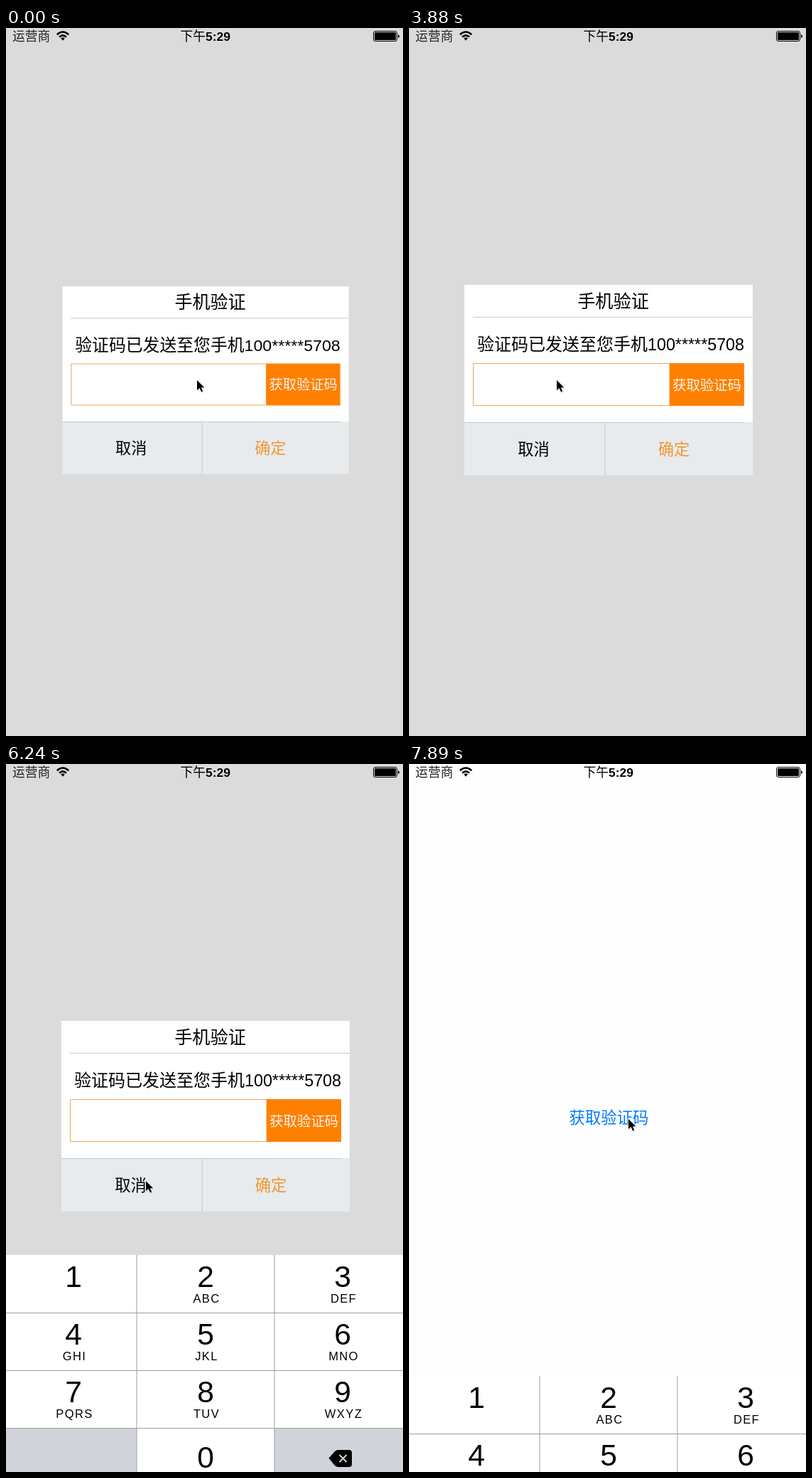
An HTML page for the animation above (8000 ms loop, 559x995 px).

```html
<!DOCTYPE html>
<html lang="zh-CN">
<head>
<meta charset="utf-8">
<title>手机验证</title>
<style>
html, body { margin: 0; width: 100%; height: 100%; overflow: hidden; background: #fff; }
svg { display: block; width: 100vw; height: 100vh; }
text { font-family: "Noto Sans CJK SC", "Noto Sans CJK", sans-serif; font-weight: 300; text-anchor: middle; }
.latin { font-family: "Liberation Sans", Arial, sans-serif; font-weight: 400; }
.start { text-anchor: start; }
.bold { font-weight: 700; }
.medium { font-weight: 500; }
</style>
</head>
<body>
<svg viewBox="0 0 559 995" preserveAspectRatio="none">
  <rect width="559" height="995" fill="#fefefe"/>
  <text x="281.5" y="505" font-size="22.4" fill="#007aff">获取验证码</text>
  <rect id="shade" width="559" height="995"/>

  <g id="dialog">
    <path d="M78 361h406v193H78z" fill="#fff"/>
    <path d="M78 554h406v75H78z" fill="#e8ebee"/>
    <path d="M90 406.5H484M78 554.5H472M276 554V629" stroke="#c6c9ca" fill="none"/>
    <text x="287.5" y="392.5" font-size="25.2">手机验证</text>
    <text class="start" x="96" y="453" font-size="24">验证码已发送至您手机</text>
    <text class="latin start" x="336" y="453" font-size="23.3">100*****5708</text>
    <path d="M90.5 471.5H367V530.5H90.5z" fill="#fff" stroke="#eda54e"/>
    <rect id="caret" x="96" y="484" width="3" height="31" fill="#dfe5fb"/>
    <path d="M367 471h105v60H367z" fill="#ff8000"/>
    <text x="419.5" y="508.5" font-size="19.4" fill="#f6f3ee">获取验证码</text>
    <text x="175.5" y="600" font-size="22.3">取消</text>
    <text x="373" y="600" font-size="22.3" fill="#f19733">确定</text>
  </g>

  <g id="keyboard">
    <path d="M0 0H559V324H0z" fill="#fff"/>
    <path d="M0 243H184V324H0zM378 243H559V324H378z" fill="#d0d4da"/>
    <path d="M0 81.5H559M0 162.5H559M0 243.5H559M184 0V324M378 0V324" stroke="#9b9da0" fill="none"/>
    <g id="keys"></g>
    <path d="M454.500 285.500L463 276Q465 274 468 274H483Q487 274 487 278V294Q487 298 483 298H468Q465 298 463 296Z"/>
    <path d="M469.500 281l10 10m0-10l-10 10" stroke="#d0d4da" stroke-width="2"/>
  </g>

  <g id="status">
    <text class="start" x="9" y="18" font-size="17.7" fill="#222">运营商</text>
    <g fill="none" stroke="#000" stroke-width="2.600">
      <path d="M71.800 9.200Q80 1.800 88.200 9.200M75 12.600Q80 8 85 12.600"/>
    </g>
    <path d="M77.200 14.500Q80 12 82.800 14.500L80 17.800z"/>
    <text class="medium start" x="245.500" y="18" font-size="17.8">下午</text>
    <text class="latin bold start" x="281" y="18" font-size="17.4">5:29</text>
    <rect x="517.500" y="4.500" width="33" height="14" rx="2.500" fill="none" stroke="#000"/>
    <rect x="519" y="6" width="30" height="11" rx="1"/>
    <path d="M552 9q2 .5 2 2.500t-2 2.500z"/>
  </g>

  <g id="cursor">
    <path d="M1 1.500V15.500L4.500 12.500L7 18L9.500 17L7 11.500H11.500Z" opacity=".22"/>
    <path d="M0 0V14L3.500 11L6 16.500L8.200 15.600L5.900 10.300H10.300Z" stroke="#fff" stroke-width="1.400" paint-order="stroke"/>
  </g>
</svg>

<script>
const LOOP = 8000;
const TICK = 148.6;
const KEY_ROW = 81;
const KEY_COLUMNS = [95, 281, 474];
const KEY_LETTERS = ["", "ABC", "DEF", "GHI", "JKL", "MNO", "PQRS", "TUV", "WXYZ"];

const el = id => document.getElementById(id);
const move = (id, x, y) => el(id).setAttribute("transform", `translate(${x} ${y})`);

const label = (x, y, size, spacing, text) =>
  `<text class="latin" x="${x}" y="${y}" font-size="${size}" letter-spacing="${spacing}">${text}</text>`;

el("keys").innerHTML = KEY_LETTERS.map((letters, i) => {
  const x = KEY_COLUMNS[i % 3];
  const y = Math.floor(i / 3) * KEY_ROW;
  return label(x, y + 45, 42.5, 0, i + 1) + label(x + 1.5, y + 67, 16.5, 1.4, letters);
}).join("") + label(281, 3 * KEY_ROW + 56, 42.5, 0, 0);

// Each path is a list of [tick, ...values].
const cursorPath = [
  [14, 269, 495], [15, 231, 501], [16, 225, 503], [18, 229, 500], [20, 245, 495],
  [21, 262, 493], [22, 263, 492], [23, 269, 493], [25, 269, 493], [26, 208, 495],
  [28, 188, 505], [30, 192, 512], [32, 203, 513], [33, 203, 513], [34, 205, 530],
  [36, 207, 578], [39, 200, 586], [42, 197, 586], [44, 188, 587], [47, 188, 587],
  [49, 230, 470], [51, 290, 396], [53, 309, 499]
];
const dialogPath = [[42, 0], [43, -150], [44, -410], [45, -650]];
const shadePath = [[42, 0.137], [44, 0.084], [47, 0]];

function along(path, tick) {
  const next = path.findIndex(point => point[0] > tick);
  if (next === 0) return path[0].slice(1);
  if (next < 0) return path[path.length - 1].slice(1);
  const a = path[next - 1], b = path[next];
  const k = (tick - a[0]) / (b[0] - a[0]);
  return a.slice(1).map((value, i) => value + (b[i + 1] - value) * k);
}

// Critically damped spring from 0 to 1.
function spring(elapsed) {
  const x = 0.74 * Math.max(0, elapsed);
  return 1 - (1 + x) * Math.exp(-x);
}

function keyboardTop(tick) {
  const shown = tick < 44 ? spring(tick - 35.78) : 1 - spring(tick - 50.35);
  return Math.round(995 - 323 * shown);
}

function render(time) {
  const tick = Math.floor((time % LOOP + 10) / TICK);
  const small = Math.max(0, 1 - tick / 5) ** 2;
  const [lift] = along(dialogPath, tick);

  el("dialog").setAttribute("transform",
    `translate(281 ${495 + lift}) scale(${1 - 0.007 * small} ${1 - 0.016 * small}) translate(-281 -495)`);
  el("caret").setAttribute("opacity", tick >= 43 ? 1 : 0);
  el("shade").setAttribute("opacity", along(shadePath, tick)[0]);
  move("keyboard", 0, keyboardTop(tick));
  move("cursor", ...along(cursorPath, tick));
}

const start = performance.now();
function frame() {
  render(performance.now() - start);
  requestAnimationFrame(frame);
}
frame();
</script>
</body>
</html>
```
